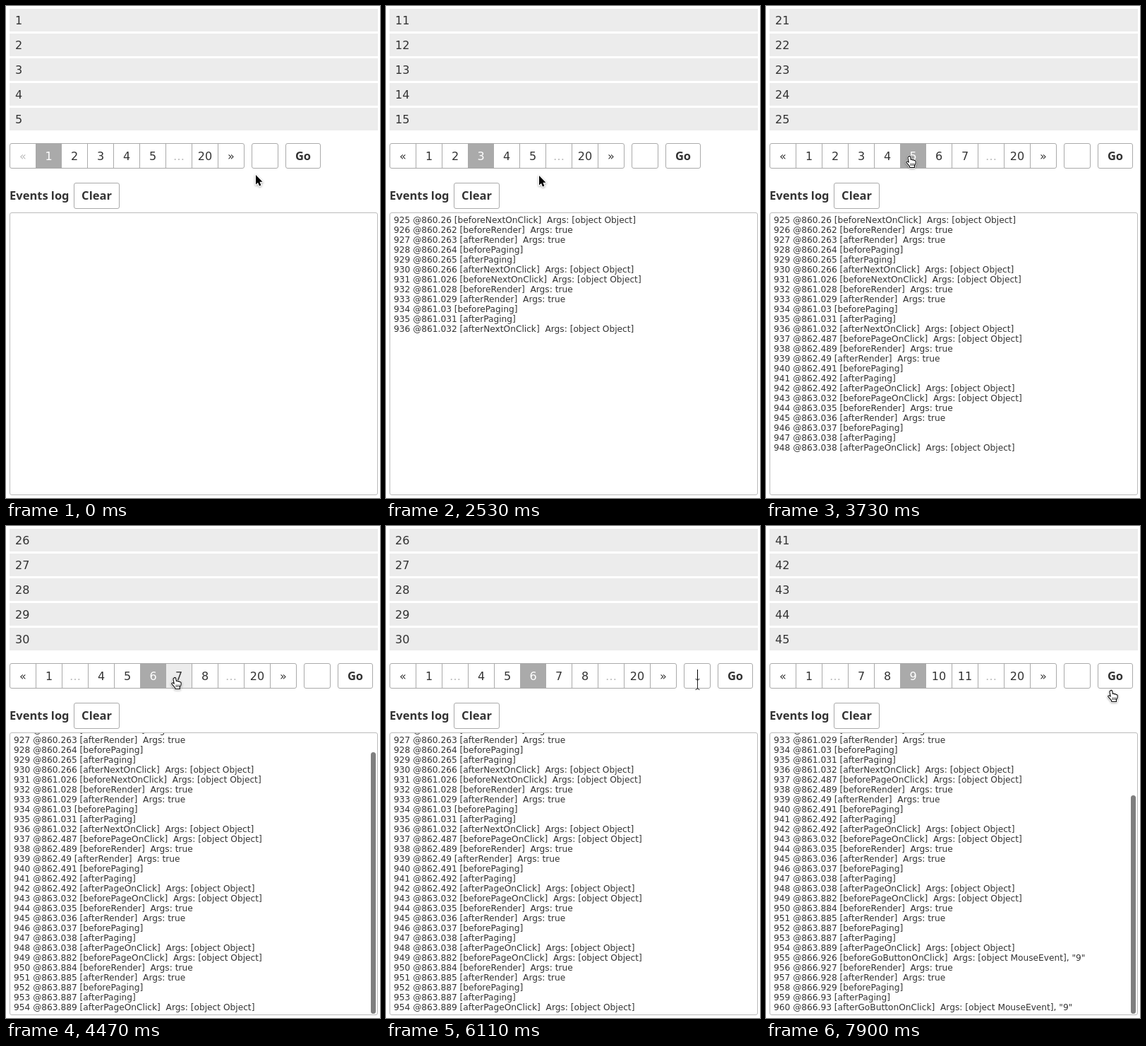
These frames come from a looping animation (530 px wide and 696 px high, 8 s). An HTML page with a canvas:

```html
<!DOCTYPE html>
<html lang="en">
<head>
<meta charset="utf-8">
<title>Pagination events</title>
<style>
  html, body { margin: 0; width: 100%; height: 100%; overflow: hidden; background: #fff; }
  canvas { display: block; }
</style>
</head>
<body>
<canvas id="stage" width="530" height="696"></canvas>
<script>
const ctx = document.getElementById('stage').getContext('2d');
const LOOP = 8000, CELL = 37, LINE = 14, LAST_PAGE = 20;
const INK = '#333', BORDER = '#aaa', PALE = '#bbb';
const UI = '16px "DejaVu Sans", sans-serif';
const BOLD = 'bold 16.5px "Noto Sans", sans-serif';
const LOG = '12.2px "DejaVu Sans", sans-serif';

// [time, page]: every page after the first adds one group of log lines
const pages = [[0, 1], [880, 2], [1630, 3], [3130, 4], [3730, 5], [4470, 6], [7600, 9]];

// [handler, clock in ms, offset of each of the six events]
const groups = [
  ['NextOnClick', 860260, '023456'],
  ['NextOnClick', 861026, '023456'],
  ['PageOnClick', 862487, '023455'],
  ['PageOnClick', 863032, '034566'],
  ['PageOnClick', 863882, '023557'],
  ['GoButtonOnClick', 866926, '012344'],
];
const logLines = groups.flatMap(([handler, clock, offsets], g) => {
  const args = '  Args: ' + (handler[0] === 'G' ? '[object MouseEvent], "9"' : '[object Object]');
  const events = [
    ['before' + handler, args], ['beforeRender', '  Args: true'], ['afterRender', '  Args: true'],
    ['beforePaging', ''], ['afterPaging', ''], ['after' + handler, args],
  ];
  return events.map(([name, tail], i) =>
    `${925 + g * 6 + i} @${(clock + +offsets[i]) / 1000} [${name}]${tail}`);
});

// [time, shape, x, y]
const pointer = [
  [0, 'arrow', 354, 239], [150, 'arrow', 350, 237], [290, 'arrow', 341, 231],
  [440, 'hand', 325, 219], [580, 'hand', 322, 217],
  [2530, 'arrow', 217, 240], [2680, 'arrow', 187, 232], [2830, 'hand', 165, 213],
  [3280, 'hand', 188, 212], [3430, 'hand', 198, 212],
  [4020, 'hand', 206, 212], [4170, 'hand', 223, 213], [4320, 'hand', 234, 214],
  [4920, 'arrow', 268, 236], [5060, 'arrow', 364, 239], [5210, 'arrow', 430, 234],
  [5360, 'beam', 441, 224],
  [7000, 'arrow', 464, 229], [7150, 'hand', 490, 222], [7300, 'hand', 501, 219],
  [7900, 'hand', 484, 232],
];
const shapes = {
  arrow: new Path2D('M0 0V13.5L3 10.8 5 15.5 7.4 14.5 5.4 9.8H9.5Z'),
  hand: new Path2D('M4 1C5.5-.3 6.6.8 6.8 2.2L7.4 5.5C8.3 4.6 9.6 5 9.8 6 10.8 5.2 12 5.7 12.2 6.7 ' +
    '13.4 6.1 14.3 7 14.2 8.4L14 11 12.4 14V16.5H5.8L5.4 14.6 1 9.6C.2 8.3 1.4 7.3 2.7 7.9L4.2 9.2 3 3C2.8 2 3.2 1.3 4 1Z'),
  knuckles: new Path2D('M7.2 10.5V14M9.3 10.5V14M11.4 10.5V14'),
  beam: new Path2D('M-3-7.5Q0-7.5 0-5V5Q0 7.5-3 7.5M3-7.5Q0-7.5 0-5V5Q0 7.5 3 7.5'),
};

const latest = (track, t) => track.findLastIndex(step => step[0] <= t);

function rect(x, y, w, h, color) {
  ctx.fillStyle = color;
  ctx.fillRect(x, y, w, h);
}
function outline(x, y, w, h, color = BORDER) {
  ctx.strokeStyle = color;
  ctx.lineWidth = 1;
  ctx.beginPath();
  ctx.roundRect(x + .5, y + .5, w - 1, h - 1, 2.5);
  ctx.stroke();
}
function text(str, x, y, font = UI, color = INK, align = 'left') {
  ctx.font = font;
  ctx.fillStyle = color;
  ctx.textAlign = align;
  ctx.fillText(str, x, y);
}

function pagerLabels(page) {
  const first = page - 2 > 3 ? page - 2 : 1, last = Math.max(5, page + 2);
  const labels = first > 1 ? ['«', 1, '…'] : ['«'];
  for (let n = first; n <= last; n++) labels.push(n);
  return [...labels, '…', LAST_PAGE, '»'];
}

function drawPager(page, shape, tipX) {
  const labels = pagerLabels(page);
  let x = 5;
  labels.forEach((label, i) => {
    const active = label === page;
    const disabled = label === '…' || (label === '«' && page === 1);
    const width = active ? CELL - 1 : CELL;
    const hovered = shape === 'hand' && tipX >= x && tipX < x + width;
    if (active) rect(x, 194, CELL, 36, BORDER);
    else if (hovered && !disabled) rect(x + 1, 195, CELL - 1, 34, '#ececec');
    if (i) rect(x, 194, 1, 36, BORDER);
    text(label, x + 1 + (width - 1) / 2, 218, UI, active ? '#fff' : disabled ? PALE : INK, 'center');
    x += width;
  });
  outline(5, 194, x - 4, 36);
  return x + 1;
}

function drawInput(x, t) {
  outline(x, 194, 38, 36);
  if (t >= 6710 && t < 7600) text('9', x + 19, 218, UI, '#000', 'center');
  if ((t >= 5360 && t < 5660) || (t >= 6110 && t < 6710)) rect(x + 19, 203, 1, 18, '#000');
  if (t >= 6710 && t < 7000) rect(x + 23, 203, 1, 18, '#000');
}

function drawLog(count, t) {
  outline(5, 292, 522, 400, PALE);
  ctx.save();
  ctx.beginPath();
  ctx.rect(6, 293, 520, 398);
  ctx.clip();
  const scroll = Math.max(0, count - 28) * LINE;
  logLines.slice(0, count).forEach((line, i) => text(line, 11, 307 + i * LINE - scroll, LOG));
  const opacity = t >= 7600 || (t >= 4470 && t < 4920) ? 1 : t >= 4920 && t < 5060 ? .5 : 0;
  if (opacity) {
    const height = Math.round(396 * 398 / (count * LINE + 6));
    ctx.globalAlpha = opacity;
    ctx.fillStyle = '#7f7f7f';
    ctx.beginPath();
    ctx.roundRect(517, 690 - height, 7, height, 3.5);
    ctx.fill();
  }
  ctx.restore();
}

function drawPointer(shape, x, y) {
  ctx.save();
  ctx.translate(x, y);
  ctx.lineJoin = 'round';
  if (shape === 'beam') {
    ctx.strokeStyle = '#222';
    ctx.lineWidth = 1;
    ctx.translate(.5, 0);
    ctx.stroke(shapes.beam);
  } else {
    const arrow = shape === 'arrow';
    ctx.shadowColor = 'rgba(0,0,0,.35)';
    ctx.shadowBlur = 3;
    ctx.shadowOffsetY = 1;
    ctx.strokeStyle = '#fff';
    ctx.lineWidth = 2.4;
    ctx.stroke(shapes[shape]);
    ctx.shadowColor = 'transparent';
    ctx.fillStyle = arrow ? '#000' : '#fff';
    ctx.fill(shapes[shape]);
    if (!arrow) {
      ctx.strokeStyle = '#000';
      ctx.lineWidth = 1.1;
      ctx.stroke(shapes.hand);
      ctx.lineWidth = .8;
      ctx.stroke(shapes.knuckles);
    }
  }
  ctx.restore();
}

function draw(t) {
  const clicks = latest(pages, t), page = pages[clicks][1];
  const [, shape, x, y] = pointer[latest(pointer, t)];
  rect(0, 0, 530, 696, '#fff');
  for (let i = 0; i < 5; i++) {
    rect(5, 4 + i * 35, 522, 32, '#ececec');
    text((page - 1) * 5 + i + 1, 13, 26 + i * 35);
  }
  const end = drawPager(page, shape, x + 5);
  drawInput(end + 10, t);
  outline(end + 58, 194, 50, 36);
  text('Go', end + 83, 218, BOLD, INK, 'center');
  text('Events log', 5, 274, BOLD);
  outline(96, 250, 65, 37);
  text('Clear', 128.5, 274, BOLD, INK, 'center');
  drawLog(clicks * 6, t);
  drawPointer(shape, x, y);
}

const start = performance.now();
function tick() {
  draw((performance.now() - start) % LOOP);
  requestAnimationFrame(tick);
}
tick();
</script>
</body>
</html>
```
